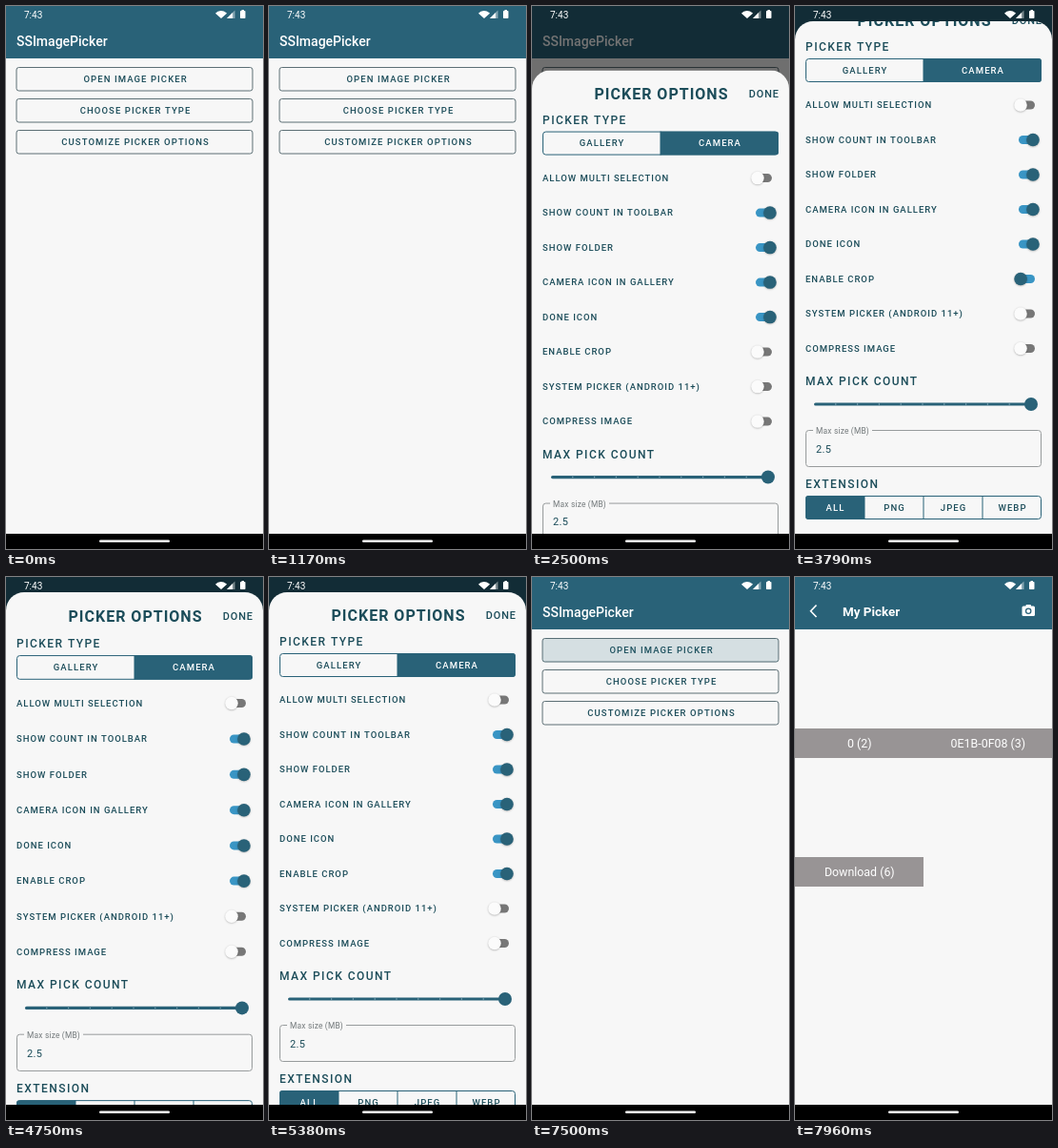
An HTML page with a canvas for the animation above (8000 ms loop, 270 px wide and 570 px high).

```html
<!DOCTYPE html>
<html lang="en">
<head>
<meta charset="utf-8">
<title>Image picker demo</title>
<style>
  html, body { margin: 0; width: 100%; height: 100%; overflow: hidden; background: #f7f7f7; }
  canvas { display: block; width: 270px; height: 570px; }
</style>
</head>
<body>
<canvas id="stage"></canvas>
<script>
const W = 270, H = 570, LOOP = 8000, NAV = 554;
const TEAL = '#296278', INK = '#1b4c59', PAPER = '#f7f7f7', SKY = '#3995c4';
const DIM = 0.55;
const ROWS = ['ALLOW MULTI SELECTION', 'SHOW COUNT IN TOOLBAR', 'SHOW FOLDER', 'CAMERA ICON IN GALLERY',
  'DONE ICON', 'ENABLE CROP', 'SYSTEM PICKER (ANDROID 11+)', 'COMPRESS IMAGE'];
const BUTTONS = ['OPEN IMAGE PICKER', 'CHOOSE PICKER TYPE', 'CUSTOMIZE PICKER OPTIONS'];

const dpr = window.devicePixelRatio || 1;
const stage = document.getElementById('stage');
const layer = document.createElement('canvas');
const [page, over] = [stage, layer].map(c => {
  c.width = W * dpr;
  c.height = H * dpr;
  const g = c.getContext('2d');
  g.scale(dpr, dpr);
  g.textBaseline = 'alphabetic';
  return g;
});

const clamp = x => Math.max(0, Math.min(1, x));
const span = (t, from, to) => clamp((t - from) / (to - from));
const smooth = x => x * x * (3 - 2 * x);
const easeOut = x => 1 - (1 - x) * (1 - x);

// Linear interpolation through [time, value] points.
function track(t, points) {
  if (t <= points[0][0]) return points[0][1];
  for (let i = 1; i < points.length; i++) {
    const [t0, v0] = points[i - 1], [t1, v1] = points[i];
    if (t <= t1) return v0 + (v1 - v0) * (t - t0) / (t1 - t0);
  }
  return points[points.length - 1][1];
}

// Text centred vertically on its capitals.
function text(g, str, x, y, size, color, { weight = 500, gap = 0, align = 'left' } = {}) {
  g.font = `${weight} ${size}px Roboto, sans-serif`;
  g.letterSpacing = gap + 'px';
  g.fillStyle = color;
  g.textAlign = 'left';
  const w = g.measureText(str).width - gap;
  g.fillText(str, align === 'center' ? x - w / 2 : align === 'right' ? x - w : x, y + size * 0.355);
}

function box(g, x, y, w, h, r, fill, stroke) {
  g.beginPath();
  g.roundRect(x, y, w, h, r);
  if (fill) { g.fillStyle = fill; g.fill(); }
  if (stroke) { g.strokeStyle = stroke; g.lineWidth = 1; g.stroke(); }
}

function disc(g, x, y, r, fill) {
  g.beginPath();
  g.arc(x, y, r, 0, Math.PI * 2);
  g.fillStyle = fill;
  g.fill();
}

function shape(g, points, fill) {
  g.beginPath();
  points.forEach(([x, y]) => g.lineTo(x, y));
  g.closePath();
  g.fillStyle = fill;
  g.fill();
}

function statusBar(g) {
  text(g, '7:43', 19, 9, 10, '#fff', { weight: 400 });
  g.beginPath();
  g.moveTo(226, 13);
  g.arc(226, 13, 8, -Math.PI * 0.77, -Math.PI * 0.23);
  g.closePath();
  g.fillStyle = '#fff';
  g.fill();
  shape(g, [[232, 13], [240.5, 13], [240.5, 4.5]], 'rgba(255,255,255,.45)');
  shape(g, [[232, 13], [238, 13], [238, 7]], '#fff');
  box(g, 246, 5, 5.5, 8, 0.8, '#fff');
  box(g, 247.5, 4, 2.5, 1.5, 0, '#fff');
}

function navBar(g) {
  g.fillStyle = '#000';
  g.fillRect(0, NAV, W, H - NAV);
}

function header(g) {
  g.fillStyle = PAPER;
  g.fillRect(0, 0, W, H);
  g.fillStyle = TEAL;
  g.fillRect(0, 0, W, 55);
}

// Growing press highlight on a button, fading after release.
function ripple(g, y, t, start) {
  const fade = 1 - span(t, start + 300, start + 500);
  if (t < start || !fade) return;
  g.save();
  g.beginPath();
  g.roundRect(11, y, 248, 25, 3);
  g.clip();
  g.globalAlpha = 0.16 * fade;
  disc(g, 135, y + 12, 20 + 120 * easeOut(span(t, start, start + 220)), TEAL);
  g.restore();
}

function home(g, t) {
  header(g);
  text(g, 'SSImagePicker', 11, 37, 14, '#fff');
  BUTTONS.forEach((label, i) => {
    const y = 64.5 + 33 * i;
    box(g, 11, y, 248, 24.5, 2.5, null, '#5c6f75');
    text(g, label, 135.5, y + 12.5, 9.5, INK, { gap: 1.08, align: 'center' });
  });
  ripple(g, 130, t, 1500);
  ripple(g, 64.5, t, 7330);
}

function folders(g, t) {
  header(g);
  g.strokeStyle = '#fff';
  g.lineWidth = 1.6;
  g.beginPath();
  g.moveTo(22.5, 29.5);
  g.lineTo(16.5, 35.7);
  g.lineTo(22.5, 42);
  g.stroke();
  text(g, 'My Picker', 50, 36, 13.4, '#fff', { weight: 700 });
  box(g, 238.5, 30.5, 13.5, 10.5, 1.5, '#fff');
  box(g, 242.5, 29, 5.5, 3, 1, '#fff');
  disc(g, 245.2, 35.8, 3.3, TEAL);
  disc(g, 245.2, 35.8, 2, '#fff');
  if (t < 7760) return;
  [['0 (2)', 0, 159], ['0E1B-0F08 (3)', 135, 159], ['Download (6)', 0, 294]].forEach(([name, x, y]) => {
    g.fillStyle = '#989495';
    g.fillRect(x, y, 135, 31);
    text(g, name, x + 67.8, y + 16, 12.4, '#fff', { weight: 400, align: 'center' });
  });
}

function segments(g, y0, y1, labels, chosen) {
  const w = 248 / labels.length;
  g.save();
  g.beginPath();
  g.roundRect(11, y0, 248, y1 - y0, 3);
  g.clip();
  g.fillStyle = TEAL;
  g.fillRect(11 + w * chosen, y0, w, y1 - y0);
  g.restore();
  box(g, 11.5, y0 + 0.5, 247, y1 - y0 - 1, 3, null, TEAL);
  labels.forEach((label, i) => {
    if (i) {
      g.fillStyle = TEAL;
      g.fillRect(10.5 + w * i, y0, 1, y1 - y0);
    }
    text(g, label, 11 + w * (i + 0.5), (y0 + y1) / 2, 9.5, i === chosen ? '#fff' : INK, { gap: 1.08, align: 'center' });
  });
}

function toggle(g, y, on, pos) {
  box(g, 235, y - 4.5, 17, 9, 4.5, on ? SKY : '#777');
  g.save();
  g.shadowColor = 'rgba(0,0,0,.28)';
  g.shadowBlur = 2 * dpr;
  g.shadowOffsetY = 0.6 * dpr;
  disc(g, 237 + 13 * pos, y, 6.8, on ? TEAL : '#fbfbfb');
  g.restore();
}

function sheet(g, t, top, entered) {
  const scroll = 25 * (easeOut(span(t, 2740, 3050)) - smooth(span(t, 4250, 4520)));
  const pull = track(t, [[4520, 0], [4750, 1], [4860, 1.1]]) * (1 - easeOut(span(t, 4860, 5180)));
  const at = d => top + d - scroll + pull * d * (0.034 - 0.000028 * d);
  const heading = (label, d) => text(g, label, 11, at(d), 12, INK, { gap: 1.45 });

  g.save();
  g.beginPath();
  g.roundRect(0, top, W, H, 19);
  g.clip();
  g.fillStyle = PAPER;
  g.fillRect(0, top, W, H);

  text(g, 'PICKER OPTIONS', 135.5, at(24.5), 16, INK, { weight: 700, gap: 1, align: 'center' });
  text(g, 'DONE', 259, at(24.5), 11, INK, { gap: 0.8, align: 'right' });
  heading('PICKER TYPE', 52);
  segments(g, at(64), at(89), ['GALLERY', 'CAMERA'], t < 5560 ? 1 : 0);

  ROWS.forEach((label, i) => {
    const y = at(113 + 36.5 * i);
    const crop = i === 5;
    const on = (i > 0 && i < 5) || (crop && t >= 3780);
    text(g, label, 11, y, 9.5, INK, { gap: 0.98 });
    toggle(g, y, on, crop ? smooth(span(t, 3780, 4020)) : on ? 1 : 0);
  });

  heading('MAX PICK COUNT', 403);
  const bar = at(427);
  box(g, 20, bar - 1.6, 228, 3.2, 1.6, TEAL);
  for (let i = 1; i < 10; i++) disc(g, 20 + 22.8 * i, bar, 0.7, '#8fb4c2');
  disc(g, 248, bar, 7, TEAL);

  const field = at(454.5);
  box(g, 11.5, field, 247, at(492.5) - field, 3, null, '#979b9c');
  g.fillStyle = PAPER;
  g.fillRect(19, field - 2, 62, 4);
  text(g, 'Max size (MB)', 22, field + 0.8, 8.4, '#747a7c', { weight: 400, gap: 0.2 });
  text(g, '2.5', 22, at(474), 11, INK, { weight: 400, gap: 0.3 });

  heading('EXTENSION', 511);
  segments(g, at(523), at(548), ['ALL', 'PNG', 'JPEG', 'WEBP'], 0);
  g.restore();
  if (entered) navBar(g);
}

function draw(t) {
  const arriving = span(t, 7540, 7700);
  home(page, t);
  if (arriving > 0) {
    over.clearRect(0, 0, W, H);
    folders(over, t);
    page.globalAlpha = smooth(arriving);
    page.drawImage(layer, 0, 0, W, H);
    page.globalAlpha = 1;
  }
  navBar(page);

  const shown = smooth(span(t, 1710, 1830));
  const leaving = span(t, 6810, 7030);
  const dim = DIM * (span(t, 1710, 1890) - leaving);
  if (dim > 0) {
    page.fillStyle = `rgba(0,0,0,${dim})`;
    page.fillRect(0, 0, W, H);
  }
  if (shown > 0 && leaving < 1) {
    const rest = track(t, [[2050, 246], [2250, 200], [2500, 68], [2600, 25], [2700, 16]]);
    const top = rest + 114 * (1 - shown) + 554 * leaving * leaving;
    over.clearRect(0, 0, W, H);
    sheet(over, t, top, shown === 1);
    page.globalAlpha = shown;
    page.drawImage(layer, 0, 0, W, H);
    page.globalAlpha = 1;
  }
  statusBar(page);
  box(page, 98, 560.5, 74, 2.6, 1.3, '#fff');
}

const begin = performance.now();
function tick() {
  draw((performance.now() - begin) % LOOP);
  requestAnimationFrame(tick);
}
tick();
</script>
</body>
</html>
```
